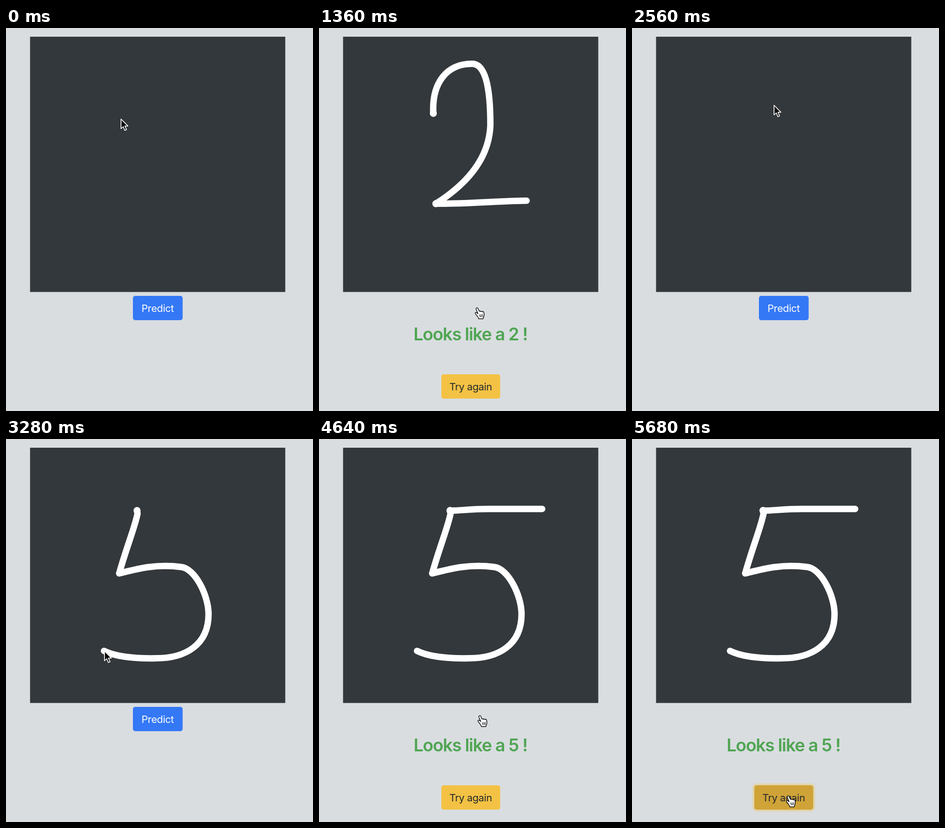
Recreate the animation shown at these times as an HTML page. Size 670 by 835 pixels, loop 5.76 s.

```html
<!DOCTYPE html>
<html lang="en">
<head>
<meta charset="utf-8">
<title>Digit prediction</title>
<style>
  html, body { margin: 0; width: 100%; height: 100%; overflow: hidden; background: #d9dde0; }
  svg { display: block; width: 100vw; height: 100vh; }
  text { font-family: Inter, Roboto, sans-serif; text-anchor: middle; }
  .label { font-size: 22px; letter-spacing: -0.4px; }
  .result { font-size: 38px; font-weight: 600; letter-spacing: -1.3px; fill: #50a553; }
  .ink { stroke: #fff; stroke-width: 14; stroke-linecap: round; stroke-linejoin: round; marker-start: url(#dot); }
  .ring { fill: none; stroke-width: 4; }
</style>
</head>
<body>
<svg viewBox="0 0 670 835">
  <defs>
    <marker id="dot" viewBox="-1 -1 2 2" markerWidth="1.1" markerHeight="1.1">
      <circle r="1" fill="#fff"/>
    </marker>
  </defs>
  <rect width="670" height="835" fill="#d9dde0"/>
  <rect x="52.5" y="19" width="557" height="556.5" fill="#33383c"/>
  <g id="paths" fill="none"></g>

  <g id="predict">
    <rect class="ring" x="275" y="582" width="112.5" height="57" rx="7" stroke="#a9c1ea"/>
    <rect class="face" x="277" y="584" width="108.5" height="53" rx="5"/>
    <text class="label" x="331" y="618.5" fill="#fff">Predict</text>
  </g>

  <g id="answer">
    <text class="result" x="330.5" y="680.5"></text>
    <g id="retry">
      <rect class="ring" x="265" y="753" width="132.5" height="57" rx="7" stroke="#e2d4ab"/>
      <rect class="face" x="267" y="755" width="128.5" height="53" rx="5"/>
      <text class="label" x="331" y="790" fill="#24292d">Try again</text>
    </g>
  </g>

  <path id="arrow" d="M1 1.5V22.5L5.8 18L9.4 26.3L13 24.7L9.5 16.7H16Z"
        fill="#080808" stroke="#fff" stroke-width="1.7" stroke-linejoin="round"/>
  <g id="hand" stroke="#080808" stroke-width="1.5" stroke-linejoin="round" stroke-linecap="round">
    <path fill="#fff" d="M0 0C-2 0-2.5 2-1.8 4L2 13L-1 10.5C-3 9.3-5 10.5-3.8 12.6L1 19C2 21 3 21 3.5 24H13
      C13.5 21 16 18 15.5 14L14.5 9.5C14 7.5 11.5 7.5 11.3 9C10.5 7 8 7 7.6 8.3C7 6.8 5 6.8 4.6 7.5L2.3 2C1.8.5 1 0 0 0Z"/>
    <path fill="none" stroke-width="1.2" d="M5.5 15L6.8 20M8.6 14.5L9.5 20M11.7 14L12 19.5"/>
  </g>
</svg>
<script>
const LOOP = 5760, STEP = 80, INK_LAG = 80;
const RETRY = 2160;
const $ = selector => document.querySelector(selector);

// The pointer follows each path in turn and rests between them; a path with "clear" leaves ink until then.
const moves = [
  { start: 0, end: 80, d: "M250 197L249.5 186" },
  { start: 80, end: 640, clear: RETRY,
    d: "M249.5 186C246 118 280 78 334 78C362 78 374 125 374 212C371 290 315 345 255 383" },
  { start: 640, end: 1040, clear: RETRY, d: "M255 383C320 384 400 376.5 453 376.5" },
  { start: 1040, end: 1280, d: "M453 376C530 440 400 570 345 610" },
  { start: 1360, end: 1920, d: "M345 610Q440 680 380 752" },
  { start: 1920, end: 2080, d: "M380 752L345 778" },
  { start: 2160, end: 2560, d: "M345 778Q325 400 309 167" },
  { start: 2560, end: 2640, d: "M309 167L286 156" },
  { start: 2640, end: 3200, clear: LOOP,
    d: "M286 156L287 163C281 193 265 230 247 293C290 282 330 272 382 279" +
       "C412 282 442 340 442 382C442 450 390 478 328 478C285 479 240 475 214 462" },
  { start: 3280, end: 3680, d: "M214 461Q240 260 286 156" },
  { start: 3760, end: 4080, clear: LOOP, d: "M286 156C300 157 330 152.5 370 152.5H487" },
  { start: 4080, end: 4400, d: "M487 152C490 300 400 560 351 603" },
  { start: 4640, end: 5200, d: "M351 603Q352 700 341 778" }
];

for (const move of moves) {
  move.path = document.createElementNS("http://www.w3.org/2000/svg", "path");
  move.path.setAttribute("d", move.d);
  move.path.setAttribute("pathLength", 1);
  if (move.clear) move.path.setAttribute("class", "ink");
  $("#paths").append(move.path);
}

function progress({ start, end }, time) {
  const u = Math.min(1, Math.max(0, (time - start) / (end - start)));
  return u * u * (3 - 2 * u);
}

const within = (time, ...spans) => spans.some(([from, to]) => time >= from && time < to);
const show = (element, visible) => element.setAttribute("visibility", visible ? "inherit" : "hidden");

function drawInk(move, time) {
  const inkTime = time - INK_LAG;
  show(move.path, inkTime >= move.start && time < move.clear);
  move.path.setAttribute("stroke-dasharray", `${progress(move, inkTime)} 2`);
}

function pointerAt(time) {
  const move = moves.findLast(({ start }) => start <= time);
  return move.path.getPointAtLength(move.path.getTotalLength() * progress(move, time));
}

function paintButton(id, [idle, hover, active], hovered, pressed) {
  $(`${id} .face`).setAttribute("fill", pressed ? active : hovered ? hover : idle);
  show($(`${id} .ring`), pressed);
}

function render(time) {
  moves.filter(move => move.clear).forEach(move => drawInk(move, time));

  const answered = within(time, [1360, RETRY], [4560, LOOP]);
  show($("#predict"), !answered);
  show($("#answer"), answered);
  $(".result").textContent = `Looks like a ${time < RETRY ? 2 : 5} !`;

  const hand = within(time, [1200, 1440], [2000, 2240], [4320, 4720], [5040, LOOP]);
  const pressed = within(time, [1280, 1360], [2080, RETRY], [4400, 4560], [5600, LOOP]);
  const retryHovered = hand && within(time, [2000, RETRY], [5040, LOOP]);
  paintButton("#predict", ["#3478f6", "#2e6ad8", "#2b63cb"],
    hand && !answered && !within(time, [RETRY, 2240]), pressed && !answered);
  paintButton("#retry", ["#f3c244", "#d9ad3c", "#cfa337"], retryHovered, pressed && answered);

  const { x, y } = pointerAt(time);
  for (const id of ["#arrow", "#hand"]) $(id).setAttribute("transform", `translate(${x} ${y})`);
  show($("#arrow"), !hand);
  show($("#hand"), hand);
}

const origin = performance.now();
function tick() {
  const time = (performance.now() - origin) % LOOP;
  render(Math.floor(time / STEP) * STEP);
  requestAnimationFrame(tick);
}
render(0);
requestAnimationFrame(tick);
</script>
</body>
</html>
```
